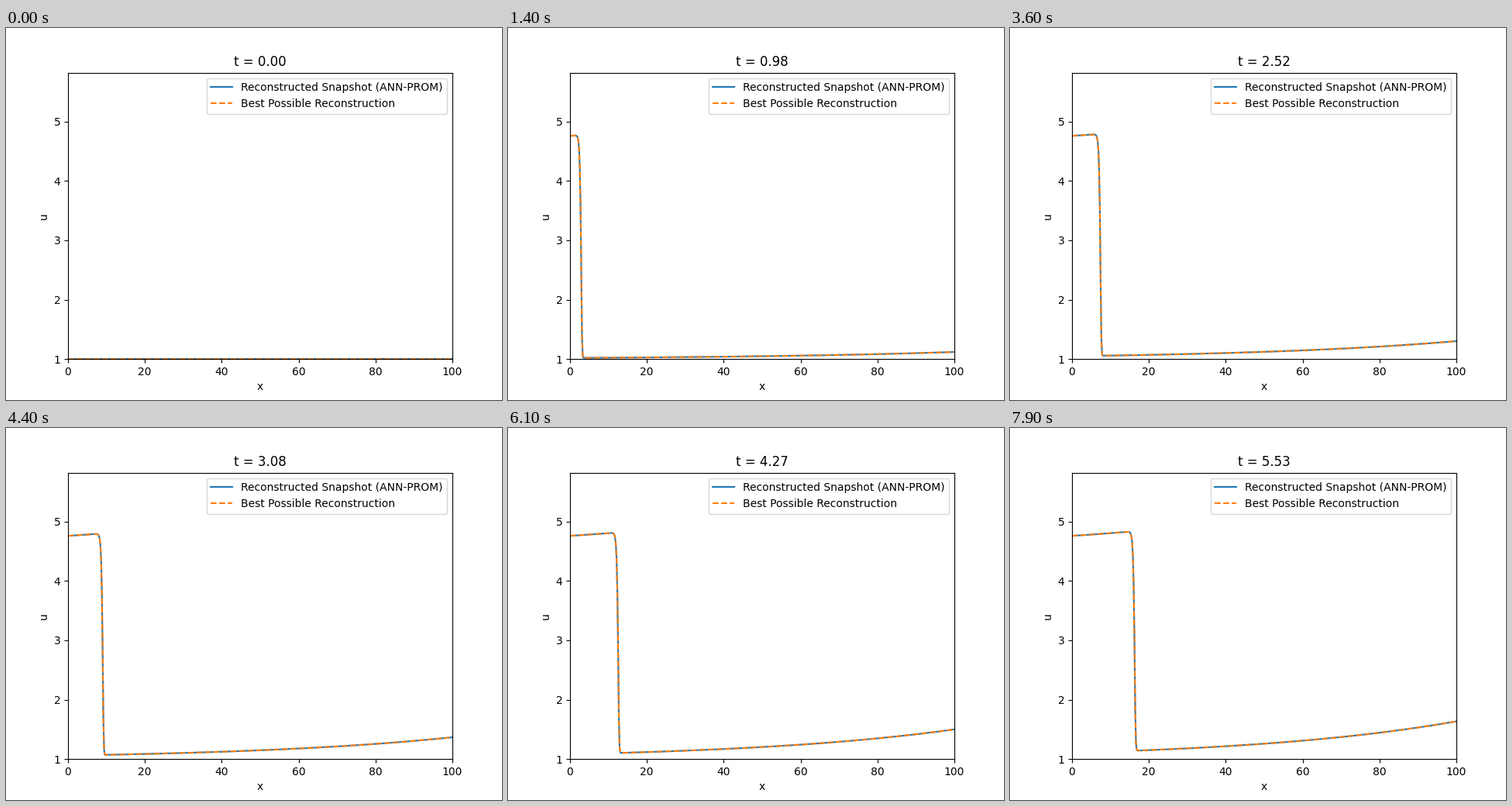
These frames come from a looping animation (640 px wide and 480 px high, 8 s). A matplotlib script:

```python
import numpy as np
import matplotlib.pyplot as plt
from matplotlib.animation import FuncAnimation

FRAMES, DT = 80, 0.07
LENGTH, CELLS = 100.0, 511
INLET, GROWTH = 4.76, 0.0182

x = np.linspace(0, LENGTH, CELLS + 1)
h = LENGTH / CELLS


def tridiag(lower, main, upper):
    return np.diag(lower, -1) + np.diag(main) + np.diag(upper, 1)


# Linear finite elements for u_t + u u_x = 0.02 exp(GROWTH x)
off = np.full(CELLS, h / 6)
main = np.full(CELLS + 1, 2 * h / 3)
main[[0, -1]] = h / 3
mass = tridiag(off, main, off)
load = DT * mass @ (0.02 * np.exp(GROWTH * x))


def convection(u):
    a, b = u[:-1], u[1:]
    c = np.zeros_like(u)
    c[:-1] += (2 * a + b) * (b - a) / 6
    c[1:] += (a + 2 * b) * (b - a) / 6
    return c


def jacobian(u):
    a, b = u[:-1], u[1:]
    d = np.zeros_like(u)
    d[:-1] += (b - 4 * a) / 6
    d[1:] += (4 * b - a) / 6
    return mass + DT * tridiag(-(2 * a + b) / 6, d, (a + 2 * b) / 6)


def step(old):
    """One backward Euler step, solved with Newton iterations."""
    u = old.copy()
    u[0] = INLET
    for _ in range(12):
        res = mass @ (u - old) + DT * convection(u) - load
        jac = jacobian(u)
        jac[0] = 0
        jac[0, 0] = 1
        res[0] = 0
        du = np.linalg.solve(jac, -res)
        u += du
        if np.abs(du).max() < 1e-5:
            break
    return u


states = [np.ones_like(x)]
while len(states) < FRAMES:
    states.append(step(states[-1]))

fig, ax = plt.subplots(figsize=(6.4, 4.8), dpi=100)
lines = [
    ax.plot(x, states[0], label="Reconstructed Snapshot (ANN-PROM)")[0],
    ax.plot(x, states[0], "--", label="Best Possible Reconstruction")[0],
]
ax.set(xlim=(0, LENGTH), ylim=(1, 5.825), xlabel="x", ylabel="u")
title = ax.set_title("t = 0.00")
ax.legend(loc="upper right")


def update(i):
    for line in lines:
        line.set_ydata(states[i])
    title.set_text(f"t = {i * DT:.2f}")
    return [*lines, title]


anim = FuncAnimation(fig, update, frames=FRAMES, interval=100,
                     repeat=True, repeat_delay=0, blit=False)
plt.show()
```
